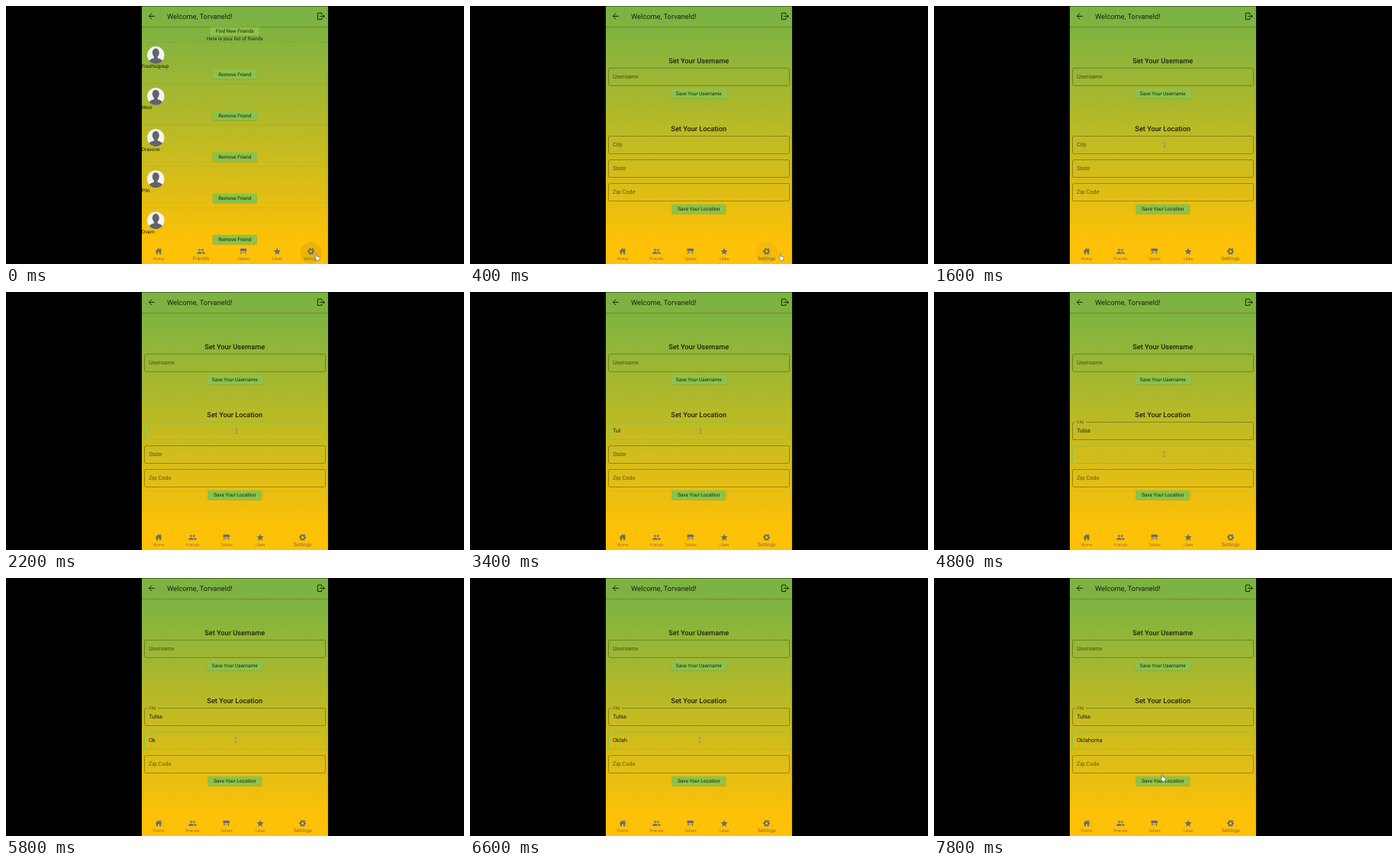
Recreate the animation shown at these times as an HTML page. Size 600 px wide and 338 px high, loop 8 s.

```html
<!DOCTYPE html>
<html lang="en">
<head>
<meta charset="utf-8">
<title>Profile settings</title>
<style>
  html, body { margin: 0; width: 100%; height: 100%; overflow: hidden; background: #000; }
  svg { display: block; width: 100vw; height: 100vh; }
  text { font-family: Roboto, sans-serif; text-rendering: geometricPrecision; }
</style>
</head>
<body>
<svg viewBox="0 0 600 338">
  <defs>
    <linearGradient id="meadow" x1="0" y1="0" x2="0" y2="1">
      <stop offset="0" stop-color="#7cb342"/>
      <stop offset="1" stop-color="#ffc107"/>
    </linearGradient>
    <linearGradient id="shade" x1="0" y1="0" x2="0" y2="1">
      <stop offset="0" stop-opacity=".24"/>
      <stop offset="1" stop-opacity="0"/>
    </linearGradient>
    <clipPath id="disc"><circle r="11.4"/></clipPath>
    <clipPath id="phone"><rect x="177.8" width="244" height="338"/></clipPath>
  </defs>
  <g id="stage" clip-path="url(#phone)"></g>
</svg>
<script>
const LOOP = 8000, TICK = 200;
const LEFT = 177.8, WIDTH = 244, MID = 299.7;
const LIME = '#8bc34a', INK = '#1d2112', ICON = '#6a6e70';
const SETTINGS_AT = 200, CITY_FOCUS = 2000, STATE_FOCUS = 4600;

const friends = ['Freshsignup', 'Mevi', 'Dravone', 'Piln', 'Ovam'];
const typing = {
  city: { word: 'Tulsa', times: [2800, 3200, 3400, 3600, 3800] },
  state: { word: 'Oklahoma', times: [5600, 5800, 6000, 6400, 6600, 6800, 7000, 7200] },
};
const pointer = [
  [0, 406.5, 324.5], [400, 406.5, 324.5], [1200, 302, 182], [4000, 302, 182],
  [4400, 301, 212.5], [7200, 301, 212.5], [7800, 299, 257.5],
];

const tabs = [
  ['Home', '<path d="M10 20v-6h4v6h5v-8h3l-3-2.7V4h-3v2.6L12 3 2 12h3v8z"/>'],
  ['Friends', '<circle cx="8" cy="8" r="3"/><circle cx="16" cy="8" r="3"/>' +
    '<path d="M1 19v-2.5C1 12 15 12 15 16.5V19zM17 19v-2.5q0-2-2-3.4c3-.4 8 .9 8 3.4V19z"/>'],
  ['Tables', '<path d="M3.5 4h17l1.7 7h-4l2 9h-2l-.9-4H6.700l-.9 4h-2l2-9h-4zM7.600 11l-.5 3h9.800l-.5-3z" fill-rule="evenodd"/>'],
  ['Likes', '<path d="M12 17.3 18.2 21l-1.6-7L22 9.2l-7.2-.6L12 2 9.2 8.6 2 9.2 7.4 14 5.8 21z"/>'],
  ['Settings', `<g fill="none" stroke="${ICON}"><circle cx="12" cy="12" r="5.5" stroke-width="4"/>` +
    '<circle cx="12" cy="12" r="8.5" stroke-width="3" pathLength="12" stroke-dasharray="1" stroke-dashoffset=".5"/></g>'],
];

const rect = (x, y, w, h, fill, extra = '') =>
  `<rect x="${x}" y="${y}" width="${w}" height="${h}" fill="${fill}" ${extra}/>`;

// y is the visual middle of the line
const label = (text, x, y, size, { fill = INK, weight = 400, anchor = 'start' } = {}) =>
  `<text x="${x}" y="${y + size * 0.35}" font-size="${size}" fill="${fill}" font-weight="${weight}" text-anchor="${anchor}">${text}</text>`;

const centered = (text, y, size, weight = 400) =>
  label(text, MID, y, size, { weight, anchor: 'middle' });

const button = (text, y, w) =>
  rect(MID - w / 2 - .3, y - 5.8, w + .6, 13, '#000', 'rx="2" opacity=".12"') +
  rect(MID - w / 2, y - 6.3, w, 12.6, LIME, 'rx="1.8"') +
  centered(text, y - .1, 6.5);

function header() {
  const line = `fill="none" stroke="${INK}" stroke-width="1"`;
  return rect(LEFT, 26.5, WIDTH, 2.5, 'url(#shade)') +
    rect(LEFT, 0, WIDTH, 26.5, '#7cb342') +
    rect(LEFT, 0, WIDTH, 1, '#000', 'opacity=".4"') +
    `<path d="M194.7 13.4h-7M191 9.7l-3.7 3.7 3.7 3.7" ${line}/>` +
    label('Welcome, Torvaneld!', 211, 13.4, 9.3) +
    `<path d="M413.5 11.3V9.2h-5.2v8.4h5.2v-2.1M410.8 13.4h6.3M415 11.1l2.3 2.3-2.3 2.3" ${line}/>`;
}

function nav(active, ripple) {
  const unit = WIDTH / 5.5;
  let x = LEFT, out = rect(LEFT, 313.5, WIDTH, 24.5, '#ffc107');
  tabs.forEach(([name, icon], i) => {
    const on = i === active, w = unit * (on ? 1.5 : 1), cx = x + w / 2;
    if (i === 4 && ripple) out += `<circle cx="${cx}" cy="323" r="14" opacity="${ripple}"/>`;
    out += `<g transform="translate(${cx - 5.6} 315.9) scale(.465)" fill="${ICON}">${icon}</g>` +
      label(name, cx, on ? 330.7 : 331.4, on ? 6.5 : 5.5,
        { fill: on ? '#6c6a52' : '#847648', anchor: 'middle' });
    x += w;
  });
  return out;
}

const avatar = y => `<g transform="translate(196.2 ${y})" clip-path="url(#disc)">
  <circle r="11.4" fill="#f3f3f1"/>
  <ellipse cy="-3" rx="4.5" ry="5.7" fill="#62636b"/>
  <path d="M-2.4 0h4.8v4q7.4 1.5 7.8 8h-20.4q.4-6.5 7.8-8z" fill="#62636b"/></g>`;

function friendsPage() {
  const rows = friends.map((name, i) => {
    const y = i * 54.15;
    return rect(LEFT, 47.3 + y, WIDTH, .6, '#000', 'opacity=".09"') +
      avatar(64.2 + y) + label(name, LEFT, 79 + y, 6.5) +
      button('Remove Friend', 89.4 + y, 58);
  });
  return button('Find New Friends', 33, 65) +
    centered('Here is your list of friends', 42.8, 6.5) + rows.join('');
}

function field(name, y, { text = '', focused = false, caret = false } = {}) {
  const floating = focused || text, x = 181.5, w = 237, h = 23, r = 2;
  const gap = floating ? name.length * 2.55 + 4 : 0;
  const path = `M${x + 3.5 + gap} ${y}H${x + w - r}q${r} 0 ${r} ${r}v${h - 2 * r}q0 ${r} ${-r} ${r}` +
    `H${x + r}q${-r} 0 ${-r} ${-r}V${y + r}q0 ${-r} ${r} ${-r}h1.5`;
  const faded = 'rgba(0,0,0,.55)', stroke = focused ? LIME : 'rgba(0,0,0,.42)';
  return `<path d="${path}" fill="none" stroke="${stroke}" stroke-width="${focused ? 1 : .7}"/>` +
    (floating
      ? label(name, 187, y, 5.6, { fill: focused ? LIME : faded })
      : label(name, 187, y + 11.2, 7.45, { fill: faded })) +
    label(text, 187, y + 11.2, 7.45) +
    (caret ? rect(187.2, y + 7.5, .9, 8.5, LIME) : '');
}

const typed = ({ word, times }, t) => word.slice(0, times.filter(at => at <= t).length);

function settingsPage(t) {
  const input = (key, from, to) => {
    const text = typed(typing[key], t), focused = t >= from && t < to;
    return { text, focused, caret: focused && !text && (t - from) % 1000 < 500 };
  };
  return centered('Set Your Username', 72, 9.2, 500) +
    field('Username', 81.3) +
    button('Save Your Username', 114.9, 74) +
    centered('Set Your Location', 161, 9.2, 500) +
    field('City', 170.5, input('city', CITY_FOCUS, STATE_FOCUS)) +
    field('State', 201.5, input('state', STATE_FOCUS, LOOP)) +
    field('Zip Code', 232.5) +
    button('Save Your Location', 266, 71);
}

function pointerAt(t) {
  const i = pointer.findIndex(p => p[0] > t);
  if (i < 0) return pointer[pointer.length - 1].slice(1);
  const [t0, x0, y0] = pointer[i - 1], [t1, x1, y1] = pointer[i];
  const p = (t - t0) / (t1 - t0), ease = p * p * (3 - 2 * p);
  return [x0 + (x1 - x0) * ease, y0 + (y1 - y0) * ease];
}

function cursor(t) {
  const [x, y] = pointerAt(t);
  const overField = [81, 170, 201, 232].some(top => y > top && y < top + 24);
  const shape = overField
    ? '<path d="M-1.4-3.2h2.8M0-3.2v6.4M-1.4 3.2h2.8" fill="none" stroke="#85857c" stroke-width=".8"/>'
    : '<path d="M-.8.2q.8-1 1.5 0v3l3.2 1q.8.4.6 1.5l-.7 3H.2L-2.2 5q.5-1 1.4 0z" fill="#fff" stroke="#333" stroke-width=".5"/>';
  return `<g transform="translate(${x} ${y})">${shape}</g>`;
}

function scene(t) {
  const settings = t >= SETTINGS_AT;
  const ripple = t < 400 ? .07 : t < 600 ? .04 : 0;
  return rect(LEFT, 0, WIDTH, 338, '#ffc107') +
    rect(LEFT, 26.5, WIDTH, 287, 'url(#meadow)') +
    (settings ? settingsPage(t) : friendsPage()) +
    header() + nav(settings ? 4 : 1, ripple) + cursor(t);
}

const stage = document.getElementById('stage');
const start = performance.now();
let shown = -1;
function frame(now) {
  const t = Math.floor(Math.max(0, now - start) % LOOP / TICK) * TICK;
  if (t !== shown) stage.innerHTML = scene(shown = t);
  requestAnimationFrame(frame);
}
frame(start);
</script>
</body>
</html>
```
